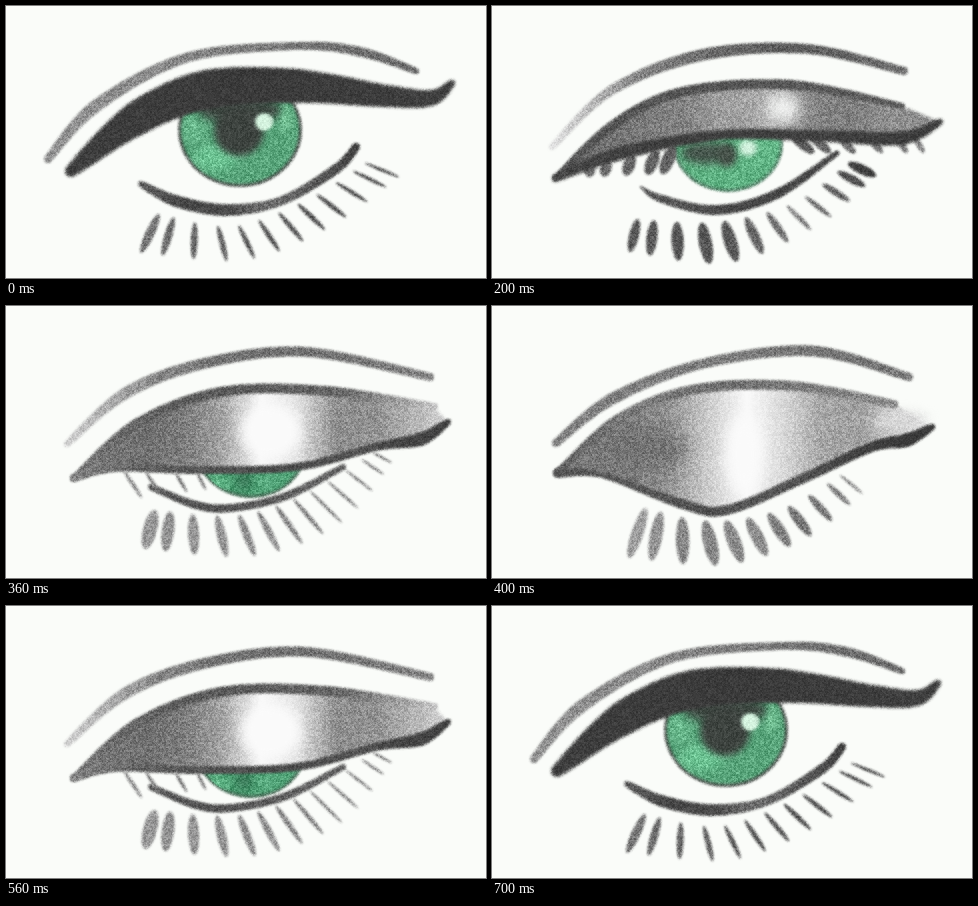
Write an HTML page with a canvas that moves like this. It is 480 px wide and 272 px high and loops after 800 ms.

```html
<!DOCTYPE html>
<html lang="en">
<head>
<meta charset="utf-8">
<title>Blinking eye</title>
<style>
html, body { margin: 0; width: 100%; height: 100%; overflow: hidden; background: #fafcf9; }
canvas { display: block; }
</style>
</head>
<body>
<canvas id="stage" width="480" height="272"></canvas>
<script>
const W = 480, H = 272, PAPER = '#fafcf9';
let ctx;

const gray = v => `rgb(${v},${v},${v})`;

// Catmull-Rom curve through key values, t from 0 to 1
function spline(keys, t) {
  const last = keys.length - 1;
  const i = Math.min(last - 1, Math.floor(t * last)), u = t * last - i;
  const key = k => keys[Math.max(0, Math.min(last, k))];
  const [a, b, c, d] = [key(i - 1), key(i), key(i + 1), key(i + 2)];
  return b.map((v, k) => v + u / 2 * (c[k] - a[k]
    + u * (2 * a[k] - 5 * v + 4 * c[k] - d[k]
    + u * (3 * v - a[k] - 3 * c[k] + d[k]))));
}

// Linear blend along evenly spaced values
function blend(values, t) {
  const s = t * (values.length - 1), i = Math.floor(s);
  return values[i] + (s - i) * ((values[i + 1] ?? values[i]) - values[i]);
}

const sample = (keys, n = 160) => Array.from({ length: n + 1 }, (_, i) => spline(keys, i / n));

function shade(x0, x1, tones) {
  const g = ctx.createLinearGradient(x0, 0, x1, 0);
  tones.forEach((v, i) => g.addColorStop(i / (tones.length - 1), gray(v)));
  return g;
}

function paint(path, style, blur) {
  ctx.filter = `blur(${blur}px)`;
  ctx.fillStyle = style;
  ctx.fill(path);
  ctx.filter = 'none';
}

// Stroke whose radius and gray tone change along its length
function brush(keys, radii, tones, blur = 1.2) {
  const path = new Path2D(), points = sample(keys);
  points.forEach(([x, y], i) => {
    const r = blend(radii, i / (points.length - 1));
    path.moveTo(x + r, y);
    path.arc(x, y, r, 0, 7);
  });
  paint(path, shade(keys[0][0], keys[keys.length - 1][0], tones), blur);
}

function lid(top, bottom, tones) {
  const path = new Path2D();
  for (const [x, y] of [...sample(top), ...sample(bottom).reverse()]) path.lineTo(x, y);
  path.closePath();
  paint(path, shade(65, 445, tones), 1.5);
}

function ellipse(x, y, rx, ry) {
  const path = new Path2D();
  path.ellipse(x, y, rx, ry, 0, 0, 7);
  return path;
}

const blob = (x, y, rx, ry, color, blur = 4) => paint(ellipse(x, y, rx, ry), color, blur);

function iris(x, y, rx, ry, color, rim, details) {
  blob(x, y, rx, ry, rim, 1);
  blob(x, y, rx - 3, ry - 3, color, 1.5);
  ctx.save();
  ctx.clip(ellipse(x, y, rx - 2, ry - 2));
  details();
  ctx.restore();
}

// Row of lashes spread between a curve of roots and a curve of tips
function fan(count, roots, tips, widths, tones) {
  for (let i = 0; i < count; i++) {
    const t = i / (count - 1), r = blend(widths, t) / 2;
    const [x0, y0] = spline(roots, t), [x1, y1] = spline(tips, t);
    const path = new Path2D();
    path.ellipse((x0 + x1) / 2, (y0 + y1) / 2, Math.hypot(x1 - x0, y1 - y0) / 2, r,
      Math.atan2(y1 - y0, x1 - x0), 0, 7);
    paint(path, gray(blend(tones, t)), 0.8);
  }
}

function openEye() {
  iris(234, 124, 62, 57, '#58a47a', '#565c58', () => {
    blob(210, 152, 22, 13, '#6fc595', 5);
    blob(188, 124, 8, 14, '#70bf93');
    blob(234, 104, 42, 14, '#3f4943', 5);
    blob(233, 125, 25, 25, '#3e4440', 3);
    blob(258, 116, 9, 9, '#d5f3df', 1.5);
    blob(280, 113, 4, 13, '#7cc99c', 3);
  });
  brush([[42, 153], [90, 100], [180, 52], [290, 40], [355, 46], [410, 65]],
    [4, 6.5, 5, 4, 5, 3], [145, 135, 120, 105]);
  brush([[65, 165], [130, 113], [200, 84], [290, 80], [380, 90], [425, 92], [446, 77]],
    [6, 17, 20, 17, 11, 8, 3], [62, 58, 64], 1.8);
  brush([[135, 178], [170, 195], [220, 204], [275, 195], [330, 163], [350, 141]],
    [3, 6, 6, 4.5, 5, 4], [90, 70, 75, 110, 90, 65]);
  fan(12, [[153, 208], [226, 220], [298, 195], [359, 157]],
    [[135, 247], [240, 254], [326, 220], [393, 171]], [9, 5, 5, 3], [115, 90, 85, 85]);
}

function halfEye() {
  const crease = [[64, 172], [120, 120], [190, 86], [300, 79], [410, 100]];
  const edge = [[64, 172], [130, 147], [230, 129], [330, 130], [410, 132], [448, 116]];
  iris(236, 138, 55, 48, '#60b384', '#5c8870', () => {
    blob(214, 147, 25, 11, '#47564d');
    blob(235, 149, 10, 12, '#465149', 3);
    blob(256, 142, 9, 8, '#d0f0dc', 2.5);
  });
  brush([[60, 141], [120, 84], [210, 49], [315, 43], [412, 65]], [3, 5, 6, 5, 4], [225, 130, 100, 95, 110]);
  lid(crease, edge, [95, 110, 122, 130, 160, 170, 135, 125, 145, 135]);
  blob(291, 102, 17, 15, '#f0f1f0', 7);
  fan(5, [[100, 158], [182, 140]], [[96, 171], [170, 168]], [11, 13], [110, 95]);
  fan(6, [[300, 130], [422, 130]], [[322, 147], [432, 147]], [10, 6], [90, 130]);
  brush(crease, [3, 5, 5, 5, 3], [85, 85, 95]);
  brush(edge, [4, 7, 5, 6, 7, 3], [70, 62, 65, 60], 1.5);
  brush([[149, 181], [170, 193], [225, 204], [285, 188], [345, 147]], [1, 4, 5, 5, 2.5], [95, 70, 75]);
  fan(12, [[146, 213], [225, 216], [301, 197], [356, 157]],
    [[138, 246], [236, 257], [326, 220], [384, 170]], [10, 14, 4, 10], [90, 85, 135, 65]);
}

function nearlyShut() {
  const crease = [[68, 172], [130, 118], [215, 86], [320, 85], [428, 101]];
  const edge = [[68, 172], [110, 162], [190, 164], [290, 161], [370, 141], [415, 133], [442, 116]];
  iris(245, 141, 56, 51, '#4a9c70', '#4c705c', () => {
    blob(211, 178, 10, 9, '#68bd8e');
    blob(238, 174, 8, 10, '#3d7c5b');
    blob(265, 176, 15, 7, '#5aab80');
  });
  brush([[61, 138], [120, 87], [200, 57], [300, 46], [424, 71]], [3, 6, 5.5, 5, 4], [205, 135, 110, 115, 130]);
  lid(crease, edge, [145, 115, 112, 125, 165, 250, 225, 140, 145, 180, 215]);
  blob(265, 125, 31, 28, '#fafafa', 6);
  brush(crease, [3, 5, 5, 5, 4], [120, 95, 90, 105, 195]);
  brush(edge, [4, 4, 4, 4, 4, 7, 3], [130, 90, 75, 80, 62]);
  brush([[145, 181], [190, 199], [225, 202], [280, 190], [337, 161]], [3, 4, 4, 4, 3], [90, 80, 95, 100]);
  fan(4, [[118, 165], [191, 167]], [[136, 192], [200, 184]], [4, 3], [140, 120]);
  fan(13, [[149, 204], [233, 209], [304, 185], [366, 146]],
    [[139, 243], [249, 250], [336, 217], [386, 157]], [14, 8, 3, 2.5], [150, 145, 125, 130]);
}

function shutEye() {
  const crease = [[66, 167], [125, 114], [200, 84], [300, 80], [402, 98]];
  const edge = [[66, 167], [110, 169], [190, 198], [235, 204], [310, 173], [380, 141], [415, 134], [440, 121]];
  brush([[64, 137], [120, 93], [210, 58], [320, 45], [417, 71]], [4, 6, 5, 5.5, 4], [130, 125, 125, 115, 120]);
  lid(crease, edge, [130, 120, 128, 150, 205, 250, 215, 165, 160, 205, 235]);
  blob(154, 143, 40, 22, '#737373', 9);
  blob(252, 148, 20, 42, '#fafafa', 7);
  blob(408, 115, 28, 8, '#dadada', 6);
  brush(crease, [4, 5, 5, 5, 4], [95, 125, 110, 125, 140]);
  brush(edge, [5, 3, 5, 5, 5, 5, 7, 3], [85, 90, 82, 85, 65, 55]);
  fan(11, [[154, 202], [220, 215], [290, 203], [348, 169]],
    [[137, 252], [233, 259], [312, 234], [371, 188]], [12, 14, 11, 3], [160, 130, 140, 115, 135]);
}

// Charcoal grain in fine and coarse cells, strongest in the middle tones
function grain(seed) {
  const noise = (x, y, k) => {
    const s = Math.sin(x * 12.9898 + y * 78.233 + seed * 3.7 + k) * 43758.5453;
    return s - Math.floor(s) - 0.5;
  };
  const image = ctx.getImageData(0, 0, W, H), px = image.data;
  for (let i = 0; i < px.length; i += 4) {
    const x = i / 4 % W, y = Math.floor(i / 4 / W);
    const ink = (250 - (px[i] + px[i + 1] + px[i + 2]) / 3) / 195;
    if (ink <= 0.01) continue;
    const n = noise(x, y, 0) + noise(x >> 1, y >> 1, 5);
    const change = n * 115 * ink * Math.max(0.1, 1.12 - ink);
    for (let k = 0; k < 3; k++) px[i + k] += change;
  }
  ctx.putImageData(image, 0, 0);
}

const poses = [openEye, halfEye, nearlyShut, shutEye].map((draw, i) => {
  const sheet = document.createElement('canvas');
  sheet.width = W;
  sheet.height = H;
  ctx = sheet.getContext('2d');
  ctx.fillStyle = PAPER;
  ctx.fillRect(0, 0, W, H);
  draw();
  grain(i + 1);
  return sheet;
});

// Eight 100 ms steps: close, then open again
const stage = document.getElementById('stage').getContext('2d');
function play() {
  const step = Math.floor(performance.now() % 800 / 100);
  stage.drawImage(poses[Math.max(0, 3 - Math.abs(step - 4))], 0, 0);
  requestAnimationFrame(play);
}
play();
</script>
</body>
</html>
```
